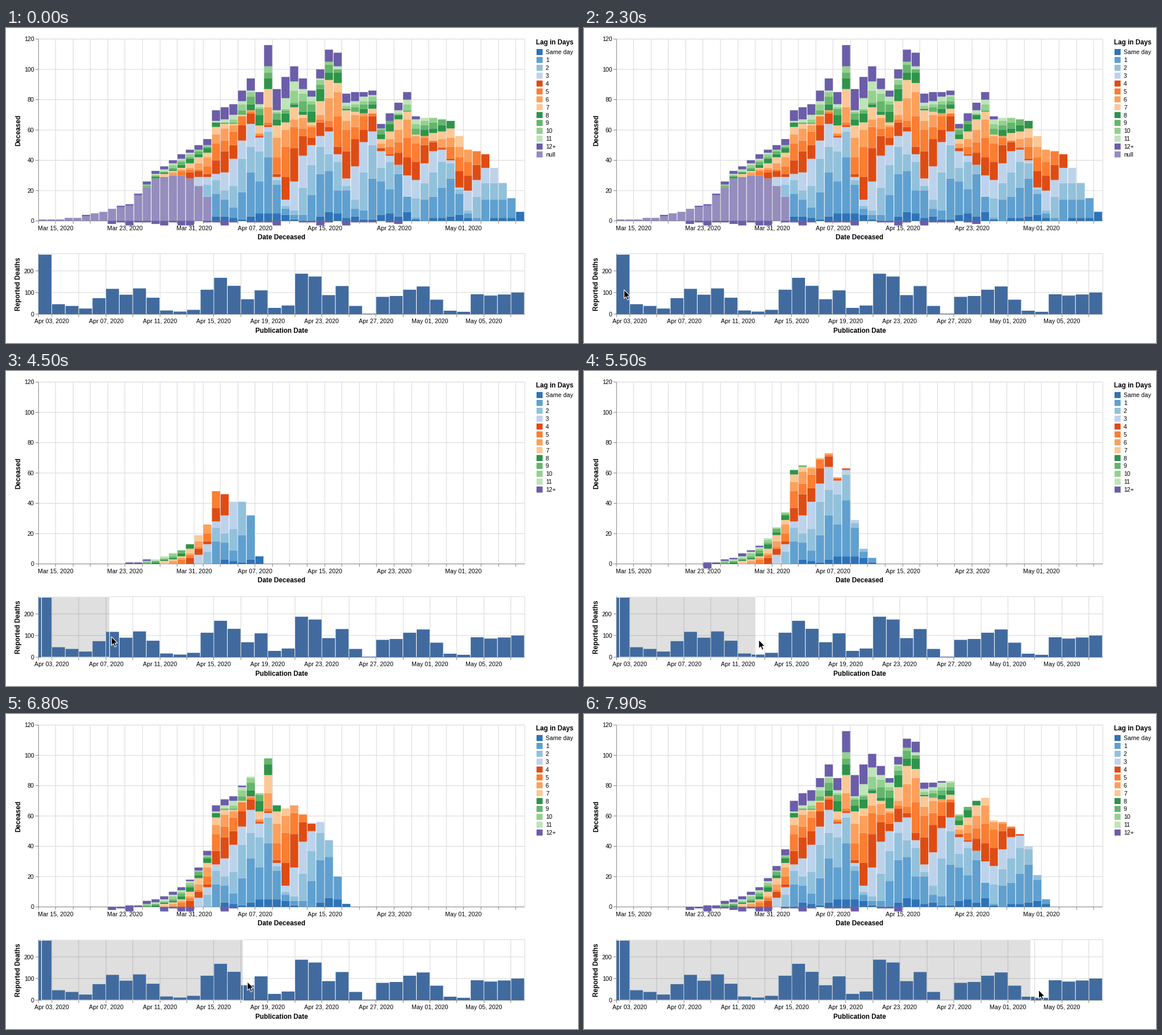
A matplotlib script that plays this animation: 1007 px wide and 556 px high, repeating every 8 s.

```python
import numpy as np
import matplotlib.pyplot as plt
from matplotlib.animation import FuncAnimation
from matplotlib.collections import PolyCollection
from matplotlib.patches import Polygon, Rectangle

W, H, DPI = 1007, 556, 64
PX = 72 / DPI                      # points per pixel
STEP = 100                         # ms per frame
FRAMES = 80

plt.rcParams["font.family"] = ["Liberation Sans", "DejaVu Sans"]

# Layout; the charts are 800 units wide, drawn at 1.07
ZOOM = 1.07
LEFT, RIGHT = 57, 913
TOP, BASE, UNIT = 19.5, 340.5, 2.675
LOW_TOP, LOW_BASE, LOW_UNIT = 398.3, 505.1, 0.382
DAYS, FIRST = 56, 20               # Mar 13 - May 07; first report on Apr 02
REPORTS = DAYS - FIRST
REPORT_W = (RIGHT - LEFT) / REPORTS
BRUSH_X = 62.5

COLORS = ["#958dbe", "#2e73b7", "#5fa0d0", "#92c1dc", "#bdd3ec",
          "#de4c14", "#fb7e32", "#fca05c", "#fcc896", "#2d944a",
          "#64b66b", "#93d18f", "#bee4b8", "#6b5da9"]
BAR = "#416b9f"
GRID, AXIS = "#dadada", "#888888"
LATE = len(COLORS) - 1

# Deaths by publication date
reported = np.array([
    275, 46, 38, 26, 74, 117, 90, 119, 76, 17, 12, 20,
    113, 168, 131, 69, 110, 29, 40, 187, 174, 88, 130, 38,
    2, 80, 84, 113, 128, 67, 16, 11, 92, 86, 91, 100])

# Deaths by date: turning points, straight lines between
TURNS = [(0, 1), (4, 2), (10, 11), (13, 33), (19, 54), (20, 73), (22, 77),
         (24, 94), (25, 85), (26, 116), (27, 87), (29, 102), (31, 86),
         (33, 113), (34, 111), (35, 84), (38, 86), (39, 64), (42, 85),
         (43, 69), (47, 66), (49, 47), (51, 44), (55, 6)]
days = np.arange(DAYS)
totals = np.interp(days, *zip(*TURNS))


def spread(rounds=60):
    """Split each day over publication days: the delays fade out
    exponentially and both margins are fitted in turn."""
    lag = days[None, :] - days[:, None]
    share = 0.22 * np.exp(-0.22 * (lag - 1.0))
    share[lag == 0] = 0.035
    share[lag < 0] = 0
    share[:, FIRST] = share[:, :FIRST + 1].sum(axis=1)
    share = share[:, FIRST:]
    for _ in range(rounds):
        share *= reported / share.sum(axis=0)
        share *= (totals / share.sum(axis=1))[:, None]
    steps = np.rint(share.cumsum(axis=1))
    return np.diff(steps, axis=1, prepend=0).astype(int)


counts = spread()

# Legend class of each cell: 0 unknown, 1-12 the lag, 13 for 12 days and more
kind = np.clip(np.arange(FIRST, DAYS) - days[:, None], 0, 12) + 1
kind[:FIRST, 0] = 0

# Late corrections below the axis
rng = np.random.default_rng(4)
fixes = rng.choice(4, DAYS, p=[0.35, 0.4, 0.15, 0.1]) * (days > 6)
fix_day = np.maximum(days + 12, 30) + rng.integers(0, 9, DAYS)


def day_pos(day):
    """Offset in units; the clock change on Mar 29 takes one hour."""
    hours = 24 * DAYS - 1
    return 800 * (24 * day - (day > 16)) / hours


def report_pos(day):
    return 800 * (day - FIRST) / REPORTS


def box(x0, y0, x1, y1):
    return [(x0, y0), (x1, y0), (x1, y1), (x0, y1)]


def stack(last, brushed):
    """Boxes and colours of the stacked bars."""
    first = 1 if brushed else 0
    shown = slice(first, last - FIRST + 1)
    shapes, colors = [], []
    if last - FIRST < first:
        return shapes, colors
    for day in days:
        x0 = LEFT + ZOOM * day_pos(day) + 0.25
        x1 = LEFT + ZOOM * day_pos(day + 1) - 0.8
        sums = np.bincount(kind[day, shown], counts[day, shown], LATE + 1)
        y = BASE
        for k in np.flatnonzero(sums):
            top = y - sums[k] * UNIT
            shapes.append(box(x0, y, x1, top))
            colors.append(COLORS[k])
            y = top
        if fixes[day] and fix_day[day] <= last:
            shapes.append(box(x0, BASE, x1, BASE + fixes[day] * UNIT))
            colors.append(COLORS[LATE])
    return shapes, colors


fig = plt.figure(figsize=(W / DPI, H / DPI), dpi=DPI, facecolor="white")
ax = fig.add_axes([0, 0, 1, 1])
ax.set_xlim(0, W)
ax.set_ylim(H, 0)
ax.axis("off")


def line(x0, y0, x1, y1, color, z):
    ax.plot([x0, x1], [y0, y1], color=color, lw=ZOOM * PX, zorder=z,
            solid_capstyle="butt", snap=False)


def text(x, y, s, ha="center"):
    return ax.text(x, y, s, fontsize=10.6 * PX, ha=ha, va="center_baseline",
                   color="black", zorder=2.5)


def title(x, y, s, ha="center", rotation=0):
    va = "center" if rotation else "center_baseline"
    ax.text(x, y, s, fontsize=11.8 * PX, weight="bold", ha=ha, va=va,
            rotation=rotation, color="black", zorder=2.5)


def date_of(day):
    """Month name and day of month, counted from Mar 13."""
    if day < 19:
        return "Mar", day + 13
    if day < 49:
        return "Apr", day - 18
    return "May", day - 48


def panel(top, base, unit, values, first, pos, every):
    """Grid, ticks and labels; a label at each `every`-th odd date."""
    for v in values:
        y = base - v * unit
        line(LEFT, y, RIGHT, y, GRID, 1)
        line(LEFT - 5, y, LEFT, y, AXIS, 2)
        text(LEFT - 7.5, y - 0.2, str(v), ha="right")
    odd = [d for d in range(first + 1, DAYS) if date_of(d)[1] % 2]
    for i, day in enumerate(odd):
        x = LEFT + 0.3 + ZOOM * int(pos(day))
        line(x, top, x, base, GRID, 1)
        line(x, base, x, base + 5, AXIS, 2)
        if i % every == 0:
            month, number = date_of(day)
            text(x, base + 12.1, f"{month} {number:02d}, 2020")
    line(LEFT, top, RIGHT, top, GRID, 1)
    line(RIGHT + 0.3, top, RIGHT + 0.3, base, GRID, 1)
    line(LEFT, base, RIGHT, base, AXIS, 2)
    line(LEFT + 0.3, top, LEFT + 0.3, base + 5, AXIS, 2)


panel(TOP, BASE, UNIT, range(0, 121, 20), 0, day_pos, 4)
panel(LOW_TOP, LOW_BASE, LOW_UNIT, range(0, 201, 100), FIRST, report_pos, 2)
title(485, 368.3, "Date Deceased")
title(485, 533.3, "Publication Date")
title(22.5, 180, "Deceased", rotation=90)
title(22.3, 451.5, "Reported Deaths", rotation=90)
title(933, 24.7, "Lag in Days", ha="left")

# Legend
names = ["Same day"] + [str(n) for n in range(1, 12)] + ["12+", "null"]
legend = []
for i, name in enumerate(names):
    y = 42.3 + 13.9 * i
    key = Rectangle((934, y - 5.2), 10.7, 10.7, lw=0, zorder=3, snap=False,
                    fc=COLORS[(i + 1) % len(COLORS)])
    legend.append((ax.add_patch(key), text(950, y, name, ha="left")))


def bar_layer(shapes):
    layer = PolyCollection(shapes, facecolors=BAR, linewidths=0, zorder=4)
    layer.set_snap(False)
    ax.add_collection(layer, autolim=False)
    return layer


bar_layer([box(LEFT + i * REPORT_W + 0.25, LOW_BASE,
               LEFT + (i + 1) * REPORT_W - 0.8, LOW_BASE - n * LOW_UNIT)
           for i, n in enumerate(reported)])
bars = bar_layer([])


def brush_layer(**style):
    return ax.add_patch(Rectangle((BRUSH_X, LOW_TOP), 1, LOW_BASE - LOW_TOP,
                                  snap=False, **style))


# Brush: shade behind the bars, white outline in front
shade = brush_layer(fc="#333333", alpha=0.155, lw=0, zorder=3)
outline = brush_layer(fc="none", ec="white", lw=ZOOM * PX, zorder=5)

ARROW = np.array([(0, 0), (0, 15.4), (3.5, 12.2), (6, 18), (8.6, 16.9),
                  (6.1, 11.2), (10.8, 11)])
cursor = ax.add_patch(Polygon(ARROW, closed=True, fc="black", ec="white",
                              lw=1.1 * PX, zorder=8))

# Key points: (time, x, y) of the free pointer, then (time, end, y) of the drag
POINTER = [(1500, 138, 548), (1900, 87, 463), (2000, 87, 463),
           (2300, 70.5, 462), (2700, 63.5, 461)]
DRAG = [(3600, 66, 461), (3700, 75.5, 461), (4500, 182.3, 469),
        (5300, 262, 473), (5500, 302.3, 474.5), (6200, 385, 473),
        (6400, 416.5, 472.5), (6800, 417.5, 472.5), (7900, 786.3, 487)]


def along(path, t):
    times, *tracks = zip(*path)
    return [np.interp(t, times, track) for track in tracks]


def update(n):
    t = n * STEP
    brushed = t >= DRAG[0][0]
    last = DAYS - 1
    x, y = along(POINTER, t)
    if brushed:
        end, y = along(DRAG, t)
        last = FIRST + int((end - LEFT) / REPORT_W)
        # the pointer runs slightly ahead of the brush
        x = LEFT + 1 + (end - LEFT) * 1.018
        shade.set_width(end - BRUSH_X)
        outline.set_width(end - BRUSH_X)
    shade.set_visible(brushed)
    outline.set_visible(brushed)

    shapes, colors = stack(last, brushed)
    bars.set_verts(shapes)
    bars.set_facecolor(colors or "none")

    for name, (key, label) in zip(names, legend):
        shown = bool(shapes) and not (brushed and name == "null")
        key.set_visible(shown)
        label.set_visible(shown)

    cursor.set_xy(ARROW + (x, y))
    cursor.set_visible(t >= POINTER[0][0])
    return []


anim = FuncAnimation(fig, update, frames=FRAMES, interval=STEP, repeat=True,
                     repeat_delay=0, blit=False)
plt.show()
```
